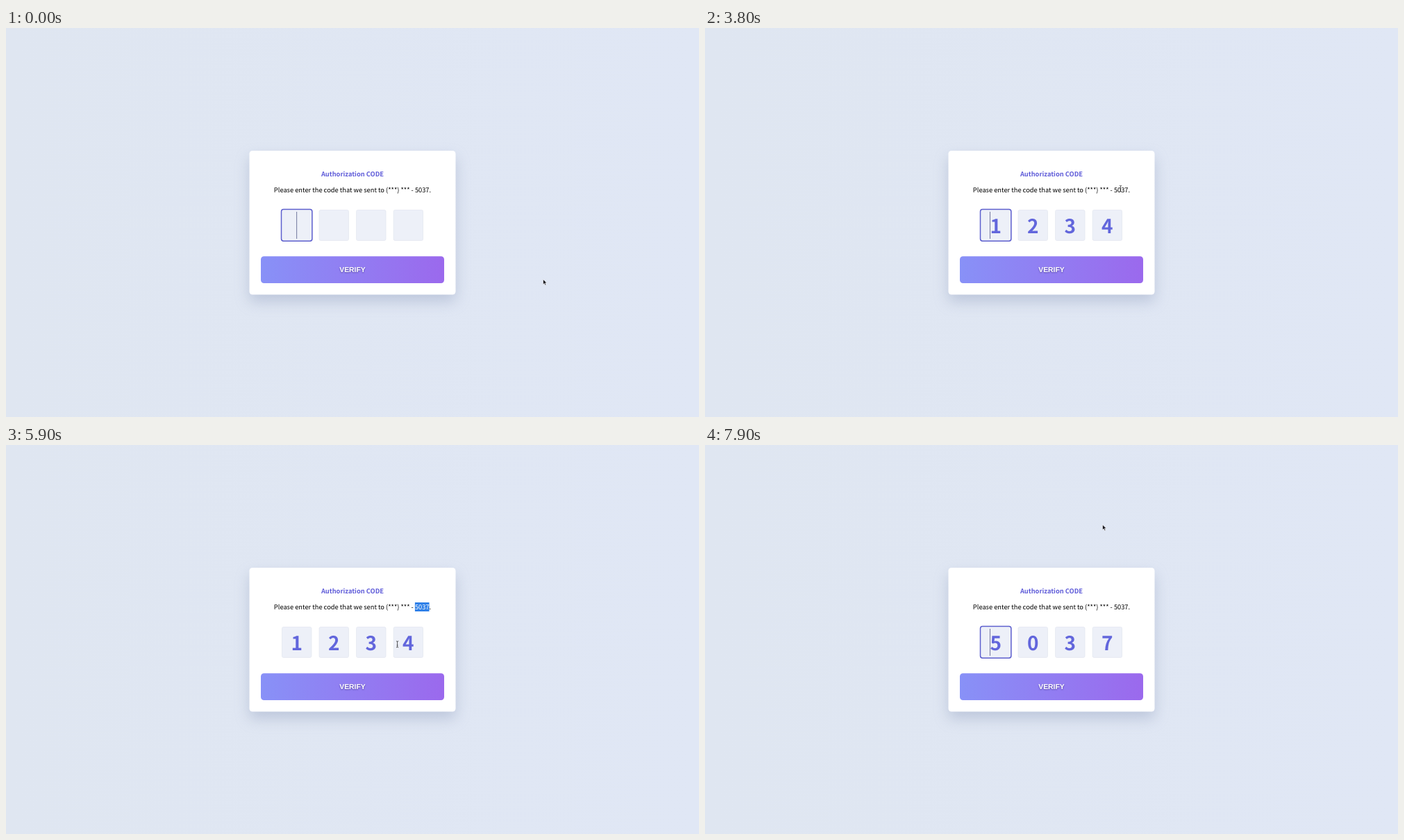
Write an HTML page that moves like this. It is 998 by 561 pixels and loops after 8 s.

```html
<!DOCTYPE html>
<html lang="zh-Hant">
<head>
<meta charset="utf-8">
<title>Authorization code</title>
<style>
  html, body { margin: 0; width: 100%; height: 100%; overflow: hidden; background: #e0e7f3; }
  svg { display: block; width: 998px; height: 561px; }
  text {
    font-family: "Noto Sans CJK TC", "Noto Sans CJK SC", "Noto Sans CJK JP", sans-serif;
    text-rendering: geometricPrecision;
    white-space: pre;
  }
  .mid { text-anchor: middle; }
  .digit { font-size: 28px; font-weight: 700; fill: #6266dc; }
  .verify {
    font: 700 10.4px "Liberation Sans", Arial, sans-serif;
    fill: #fff; text-shadow: 0 1px 2px rgba(40, 30, 90, .5);
  }
  .card { fill: #fff; filter: drop-shadow(0 10px 10px rgba(110, 125, 165, .3)); }
  .menu text { font-size: 6.8px; }
  .icon { fill: none; stroke: currentColor; stroke-width: .8; }
</style>
</head>
<body>
<svg viewBox="0 0 998 561">
  <defs>
    <linearGradient id="sky"><stop stop-color="#dfe6f1"/><stop offset="1" stop-color="#e0e7f5"/></linearGradient>
    <linearGradient id="violet"><stop stop-color="#8891f7"/><stop offset="1" stop-color="#9b69ed"/></linearGradient>
    <clipPath id="selected"><rect id="clip" y="227" height="13"/></clipPath>
  </defs>
  <rect width="998" height="561" fill="url(#sky)"/>
  <rect class="card" x="350.5" y="177" width="297" height="207.5" rx="4.5"/>
  <text class="mid" x="499" y="213.6" font-size="9.3" font-weight="700" fill="#5f5cd9">Authorization CODE</text>
  <text id="hint" class="mid" x="499" y="237" font-size="9.3">Please enter the code that we sent to (***) *** - 5037.</text>
  <g clip-path="url(#selected)">
    <rect x="386" y="227" width="227" height="13" fill="#2f80e8"/>
    <use href="#hint" fill="#fff"/>
  </g>
  <g id="boxes"></g>
  <rect id="caret" y="265" width=".8" height="39" fill="#555a86"/>
  <rect x="367" y="329.3" width="264" height="38.7" rx="4.5" fill="url(#violet)"/>
  <text class="verify mid" x="499" y="352.2">VERIFY</text>
  <g id="menu" class="menu"></g>
  <g id="pointer">
    <path id="arrow" d="M0 0V7.4L1.8 5.8L3 8.5L4.3 7.9L3.1 5.3H5.4Z" fill="#15151c" stroke="#fff" stroke-width=".6"/>
    <path id="beam" d="M-1.6-4.5Q0-4.5 0-3.5Q0-4.5 1.6-4.5M0-3.5V3.5M-1.6 4.5Q0 4.5 0 3.5Q0 4.5 1.6 4.5M-.9 1.5H.9" fill="none" stroke="#333" stroke-width=".8"/>
  </g>
</svg>
<script>
const LOOP = 8000, BLINK = 560, MENU_OPEN = 6300, MENU_CLOSE = 7500;
const $ = id => document.getElementById(id);

function add(parent, tag, attrs, content = "") {
  const el = document.createElementNS("http://www.w3.org/2000/svg", tag);
  for (const key in attrs) el.setAttribute(key, attrs[key]);
  el.textContent = content;
  return parent.appendChild(el);
}

const boxCentre = i => 418.7 + 53.55 * i;
const boxes = [0, 1, 2, 3].map(i => ({
  frame: add($("boxes"), "rect", { fill: "#edf0f8" }),
  digit: add($("boxes"), "text", { class: "digit mid", x: boxCentre(i), y: 295.6 })
}));

const icons = {
  undo: "M-3.5-4V-1H-.5M-3.5-1C-1-5 4-4 3.5-1C3.3 .5 1 2-1 4",
  redo: "M3.5-4V-1H.5M3.5-1C1-5-4-4-3.5-1C-3.3 .5-1 2 1 4",
  cut: "M-2.5-4L1.5 1.5M2.5-4L-1.5 1.5M-3.6 2.7a1.4 1.4 0 1 0 2.8 0a1.4 1.4 0 1 0-2.8 0M.8 2.7a1.4 1.4 0 1 0 2.8 0a1.4 1.4 0 1 0-2.8 0",
  copy: "M-1.5-4H3.3V2.5H-1.5ZM-1.5-2.7H-3V4H2V2.5",
  paste: "M-1 4H-3.5V-3.5H2.5V-1.5M-1.8-4.2H.8V-2.7H-1.8ZM-.5-1.2H3.7V4.2H-.5Z",
  collect: "M-3.8-3.8H1.8V1.8H-3.8ZM2-1.8H3.8V3.8H-1.8V2M-1-2.6V.6M-2.6-1H.6",
  share: "M-.5-3H-3.5V3.7H3.5V1M-1.5 1.2C-1.3-1 0-2 3-2M1.5-4L3.6-2L1.5 0",
  select: "M-1.5-3.8H0M1.5-3.8H3.8V-2M3.8-.5V2H2M-1.5-2V2H.5M-3.8-1V3.8H-2M-.5 3.8H1",
  capture: "M-3.7-1.8H-2L-1-3.6H2L3.6-1.8V1M-3.7-1.8V2.8L-1.5 3.7M3.6-2L-.5 2.2L-1 3.7L.8 3.2L4-.2M-1.5 .8A1.6 1.6 0 0 1 1-.9",
  inspect: "M-1 2.3H-3.7V-3.2H3.7V2.3H2.4M0-.2V4L1.1 2.8H2.7Z"
};

// [label, shortcut or ">" for a submenu, icon, disabled]
const menuGroups = [
  [["復原", "Ctrl+Z", "undo"], ["重做", "Ctrl+Shift+Z", "redo", true]],
  [["剪下", "Ctrl+X", "cut", true], ["複製", "Ctrl+C", "copy", true], ["貼上", "Ctrl+V", "paste"],
   ["以純文字貼上", "Ctrl+Shift+V"], ["全選", "Ctrl+A"]],
  [["將頁面新增至集錦", ">", "collect", true]],
  [["檢查拼字", ">"], ["書寫方向", ">"]],
  [["分享", "", "share"]],
  [["網頁選取", "Ctrl+Shift+X", "select"], ["網頁擷取", "Ctrl+Shift+S", "capture"]],
  [["檢查", "", "inspect"]]
];

function buildMenu() {
  const menu = $("menu");
  add(menu, "rect", { x: 522.4, y: 7.9, width: 139, height: 280, fill: "#fff", stroke: "#d9dde6", "stroke-width": .6 });
  let y = 18.6;
  menuGroups.forEach((group, g) => {
    if (g) {
      add(menu, "path", { d: `M522.5 ${y - 11.1}H661.3`, stroke: "#dcdfe5", "stroke-width": .8 });
    }
    for (const [label, hint, icon, disabled] of group) {
      const colour = disabled ? "#b4b4b6" : "#1c1c1e";
      const row = add(menu, "g", { transform: `translate(535 ${y})`, fill: colour, color: colour });
      if (icon) add(row, "path", { class: "icon", d: icons[icon] });
      add(row, "text", { x: 10, y: 2.5 }, label);
      if (hint === ">") add(row, "path", { class: "icon", d: "M116.6-2.6L119.2 0L116.6 2.6" });
      else add(row, "text", { x: 108.7, y: 2.5, "text-anchor": "end" }, hint);
      y += 17.7;
    }
    y += 4.6;
  });
}
buildMenu();

// [start, digits, focused box, caret side of the digit]
const steps = [
  [0, "", 0, 0], [1600, "1", 0, 1], [1700, "1", 1, 0], [1900, "12", 1, 1], [2000, "12", 2, 0],
  [2100, "123", 3, 0], [2300, "1234", 3, 1], [2400, "1234", 0, -1], [4000, "1234", -1, 0],
  [6250, "1234", 2, -1], [MENU_CLOSE, "5037", 0, -1]
];

// [time, x, y]
const track = [
  [0, 773.5, 362.5], [2850, 773.5, 362.5], [3750, 598.5, 231.7], [3830, 598.5, 231.7],
  [4000, 588.5, 234], [4250, 588.5, 234], [4800, 610.5, 240.5], [5350, 610.5, 240.5],
  [5550, 590, 286], [5680, 590, 286], [6200, 522, 289.5], [6550, 522, 289.5],
  [7100, 570.5, 149.5], [7400, 573, 95], [7500, 573, 95], [7850, 572.5, 115], [LOOP, 572.5, 115]
];

function pointerAt(t) {
  const next = track.findIndex(p => p[0] > t);
  const [t0, x0, y0] = track[next - 1], [t1, x1, y1] = track[next];
  const u = (t - t0) / (t1 - t0), e = u * u * (3 - 2 * u);
  return [x0 + (x1 - x0) * e, y0 + (y1 - y0) * e];
}

const inside = (x, y, left, top, right, bottom) => x > left && x < right && y > top && y < bottom;
const overText = (x, y) => inside(x, y, 386, 226, 613, 246) ||
  boxes.some((_, i) => inside(x, y, boxCentre(i) - 22, 262, boxCentre(i) + 22, 307));
const setAttrs = (el, attrs) => { for (const key in attrs) el.setAttribute(key, attrs[key]); };
const clamp = v => Math.max(0, Math.min(1, v));

function drawBoxes(t) {
  const [start, digits, focus, side] = steps.findLast(s => s[0] <= t);
  boxes.forEach(({ frame, digit }, i) => {
    const on = i === focus, half = on ? 22.2 : 21.2;
    setAttrs(frame, {
      x: boxCentre(i) - half, width: 2 * half,
      y: on ? 261.5 : 262.6, height: on ? 45.8 : 43.8, rx: on ? 3.2 : 2,
      stroke: on ? "#5d5fce" : "#e4e7f0", "stroke-width": on ? 1.5 : .8
    });
    digit.textContent = digits[i] || "";
  });
  const lit = t >= 6250 || (t - start) % (2 * BLINK) < BLINK;
  setAttrs($("caret"), { x: boxCentre(focus) + side * 8.3 - .4, opacity: focus >= 0 && lit ? 1 : 0 });
}

function drawSelection(t, x) {
  const first = $("hint").textContent.length - 5;
  const edge = n => $("hint").getStartPositionOfChar(first + n).x;
  const left = edge(0), full = edge(4) - left;
  const count = t < 4250 || t >= 6250 ? 0 : t > 4800 ? 4 : Math.round(4 * clamp((x - left) / full));
  setAttrs($("clip"), { x: left, width: full * count / 4 });
}

function draw() {
  const t = performance.now() % LOOP;
  const [x, y] = pointerAt(t);
  drawBoxes(t);
  drawSelection(t, x);
  $("menu").setAttribute("opacity", t < MENU_CLOSE
    ? clamp((t - MENU_OPEN) / 180)
    : clamp(1 - (t - MENU_CLOSE) / 100));
  const beam = t < 6560 && overText(x, y);
  $("pointer").setAttribute("transform", `translate(${x} ${y})`);
  $("beam").setAttribute("opacity", beam ? 1 : 0);
  $("arrow").setAttribute("opacity", beam ? 0 : 1);
  requestAnimationFrame(draw);
}
draw();
</script>
</body>
</html>
```
